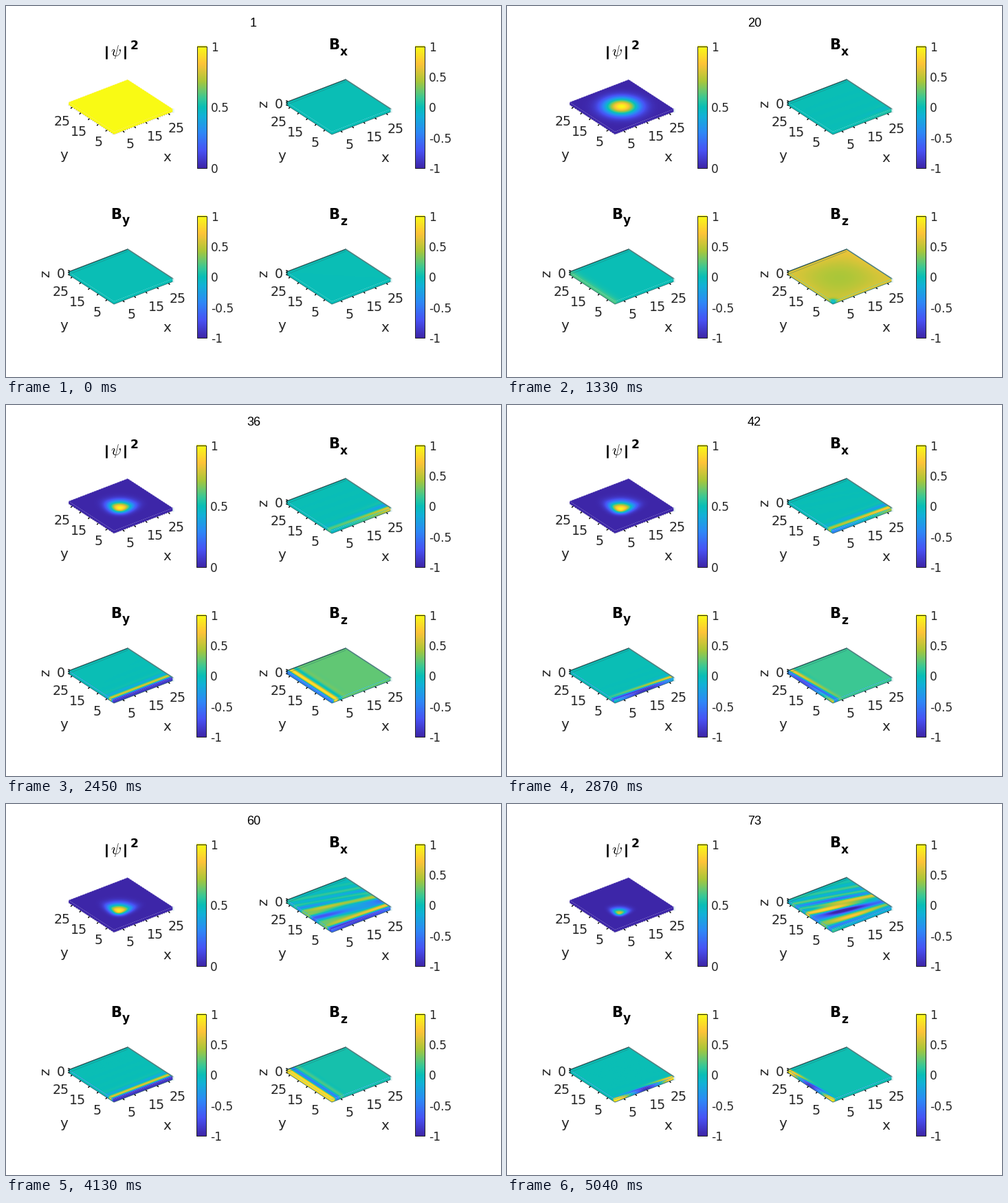
These frames come from a looping animation (720x540 px, 5110 ms). A matplotlib script:

```python
import numpy as np
import matplotlib.pyplot as plt
from matplotlib.animation import FuncAnimation
from matplotlib.colors import LinearSegmentedColormap
from matplotlib.patches import Rectangle
from matplotlib.transforms import Affine2D

W, H = 720, 540
FRAMES, STEP = 73, 70
GRAY = "#262626"

plt.rcParams["font.family"] = "DejaVu Sans"
plt.rcParams["mathtext.fontset"] = "cm"

PARULA = LinearSegmentedColormap.from_list("parula_like", [
    (0.0, (0.242, 0.150, 0.660)),
    (1 / 7, (0.281, 0.323, 0.958)),
    (2 / 7, (0.179, 0.529, 0.968)),
    (3 / 7, (0.069, 0.695, 0.839)),
    (0.5, (0.035, 0.745, 0.715)),
    (4 / 7, (0.216, 0.784, 0.592)),
    (5 / 7, (0.672, 0.779, 0.223)),
    (6 / 7, (0.997, 0.766, 0.220)),
    (1.0, (0.977, 0.984, 0.081)),
])

# Slab geometry in the first panel, pixels with y pointing down
FRONT = np.array([157, 183])
X_EDGE = np.array([86, -33])
Y_EDGE = np.array([-66, -43])
DEPTH = np.array([0, 4])

U, V = np.meshgrid(np.linspace(0, 1, 60), np.linspace(0, 1, 60))

fig = plt.figure(figsize=(W / 72, H / 72), dpi=72, facecolor="white")
ax = fig.add_axes([0, 0, 1, 1])
left_shift = Affine2D()


def write(x, y, text, size, rise=0.365, **style):
    """Place text so that its glyphs are centred on y."""
    style = {"color": GRAY, "ha": "center", **style}
    return ax.text(x, y + rise * size, text, fontsize=size, va="baseline", **style)


def sheet(origin, a, b, lo, z):
    """Image on the parallelogram spanned by a and b."""
    frame = Affine2D(np.array([[a[0], b[0], origin[0]],
                               [a[1], b[1], origin[1]],
                               [0, 0, 1]], float))
    return ax.imshow(np.zeros((2, 2)), cmap=PARULA, vmin=lo, vmax=1,
                     extent=(0, 1, 0, 1), origin="lower", aspect="auto",
                     interpolation="bilinear", zorder=z,
                     transform=frame + ax.transData)


def line(points, **style):
    xs, ys = zip(*points)
    return ax.plot(xs, ys, **{"solid_capstyle": "round", **style})[0]


class Slab:
    def __init__(self, shift, lo):
        front = FRONT + shift
        left, right = front + Y_EDGE, front + X_EDGE
        back = left + X_EDGE
        self.side_y = sheet(front, Y_EDGE, DEPTH, lo, 2)
        self.side_x = sheet(front, X_EDGE, DEPTH, lo, 2)
        self.top = sheet(front, X_EDGE, Y_EDGE, lo, 3)
        for t in (np.arange(5, 30, 5) - 1) / 26:
            for edge, out in ((X_EDGE, (1.6, 1.6)), (Y_EDGE, (-1.6, 1.6))):
                p = front + DEPTH + t * edge
                line([p, p + out], color="black", lw=1.5, zorder=1)
        rim = [left + DEPTH, front + DEPTH, right + DEPTH]
        if lo == 0:
            line(rim, color="black", lw=0.8, ls=(0, (1, 3)), alpha=0.7, zorder=4)
            line([*rim, right, back, left, rim[0]], color="white", lw=1.2,
                 ls=(0, (1.5, 1.5)), alpha=0.45, zorder=4)
        else:
            line(rim, color="#0f4f50", lw=0.9, alpha=0.7, zorder=4)
            line([left, back], color="#2b5657", lw=1.4, zorder=4)
            line([back, right], color="#4f8080", lw=1.6, zorder=4)
            line([left + (2, 3), back + (0, 3)], color="#2b6c6c", lw=0.7,
                 alpha=0.5, zorder=4)
            for dy in (-2, 1, 4):
                line([left + (-0.5, dy), left + (1.5, dy + 0.5)], color="black",
                     lw=1.3, zorder=5)
        line([right, right + DEPTH], color="#d8f0f0", lw=3, alpha=0.6, zorder=4)

    def show(self, z):
        self.top.set_data(z)
        self.side_x.set_data(np.vstack([z[0], z[0]]))
        self.side_y.set_data(np.vstack([z[:, 0], z[:, 0]]))


def axis_labels(dx, dy, flat):
    k = 2 if flat else 0
    for text, x, y in (("25", 80, 168), ("15", 104, 183), ("5", 133, 198)):
        write(x + dx + k, y + dy - k / 2, text, 19)
    for text, x, y in (("5", 183, 201), ("15", 219, 190), ("25", 250, 178)):
        write(x + dx - k, y + dy - k / 2, text, 19)
    write(234 + dx, 222 + dy - k / 2, "x", 20, rise=0.27)
    write(84 + dx, 221 + dy - k / 2, "y", 20, rise=0.17)
    if not flat:
        write(80 + dx, 142.5 + dy, "0", 19)
        ax.text(58 + dx, 142.5 + dy, "z", fontsize=20, color=GRAY, rotation=90,
                ha="center", va="center")


def color_bar(dx, dy, lo, moving):
    move = (left_shift if moving else Affine2D()) + ax.transData
    x, top, height = 277.5 + dx, 58.5 + dy, 177.5
    ax.imshow(np.linspace(1, 0, 256)[:, None], cmap=PARULA, aspect="auto",
              extent=(x, x + 14, top + height, top), transform=move)
    ax.add_patch(Rectangle((x, top), 14, height, fill=False, ec=GRAY, lw=1,
                           transform=move, zorder=5))
    count = 3 if lo == 0 else 5
    for i, value in enumerate(np.linspace(1, lo, count)):
        write(x + 20.5, top + 1 + height * i / (count - 1), f"{value:g}".replace("\u2212", "-"),
              17, ha="left", transform=move)


def title(dx, dy, sub):
    style = dict(color="black", weight="bold")
    write(160 + dx, 55 + dy, "B", 21, **style)
    write(174 + dx, 67 + dy, sub, 17, rise=0.17 if sub == "y" else 0.27, **style)


def psi_title():
    for x in (146, 173):
        line([(x, 57.5), (x, 76.5)], color="black", lw=2.6, solid_capstyle="butt")
    write(159.5, 68, r"$\psi$", 22, rise=0.23, color="black")
    write(186.5, 57, "2", 17, color="black", weight="bold")


def ease(n, start, end):
    s = np.clip((n - start) / (end - start), 0, 1)
    return s * s * (3 - 2 * s)


def bump(x, mid, width):
    return np.exp(-((x - mid) / width) ** 2)


def density(n):
    """A full slab that melts from the rim into a drifting spot."""
    if n == 1:
        return np.ones_like(U)
    width = 0.15 + 0.46 * np.exp(-(n / 14) ** 1.6) - 0.055 * ease(n, 55, 73)
    power = 6 - 4 * ease(n, 4, 20)
    centre = 0.5 - 0.0032 * max(n - 15, 0)
    skew = 0.34 * ease(n, 20, 48)
    peak = 1 - 0.2 * ease(n, 60, 73)
    base = 0.4 * (1 - ease(n, 0, 18))

    def profile(s):
        d = s - centre
        return np.exp(-np.abs(d / (width * (1 + skew * np.sign(d)))) ** power)

    return base + (peak - base) * profile(U) * profile(V)


def rim_wave(n, s, t, start, rate):
    """Breathing wave that hugs the edge s = 0 and twists along t as it narrows."""
    breath = 0.5 + 0.5 * np.cos(2 * np.pi * (n - 36) / 24.5)
    width = 0.04 + 0.085 * breath
    phase = np.pi * (start + rate * (n - 36))
    wave = np.cos(2 * np.pi * s / 0.16 - phase + 6.2 * (1 - breath) * t)
    return 0.9 * ease(n, 20, 38) * wave * np.exp(-(s / width) ** 2)


def field_x(n):
    q = V + 0.18 * U
    streaks = np.cos(2 * np.pi * (q - 0.57) / 0.37) * bump(q, 0.42, 0.27)
    streaks = streaks * (0.75 + 0.25 * np.cos(6 * U - 0.12 * n))
    ripples = 0.3 * np.cos(38 * q + 5 * U - 0.2 * n) * bump(q, 0.7, 0.3)
    lean = 1 - ease(n, 24, 52)
    edge = np.cos(2 * np.pi * (V + 0.04 * U) / 0.2 - 0.09 * (n - 16)) * bump(V, 0, 0.13)
    edge_gain = ease(n, 12, 50) * (1 - 0.5 * ease(n, 52, 70))
    return (1.1 * ease(n, 40, 75) * (streaks + ripples)
            + edge_gain * (1 - lean + lean * U ** 2) * edge)


def field_y(n):
    return (rim_wave(n, V, U, start=1, rate=0.082)
            + 0.2 * bump(n, 21, 5) * np.exp(-U / 0.05))


def field_z(n):
    rim = 0.7 * (1 - np.exp((1 - n) / 4)) / (1 + ((n - 1) / 30) ** 4)
    core = rim * (1 - np.exp(-(n / 18) ** 2.2))
    bowl = np.abs(np.sin(np.pi * U) * np.sin(np.pi * V)) ** 0.8
    slope = 0.08 * bump(n, 16, 8) * (U + V - 1)
    notch = 0.6 * bump(n, 20, 4) * np.exp(-(U ** 2 + V ** 2) / 0.004)
    return (rim + (core - rim) * bowl + slope - notch
            + rim_wave(n, U, V, start=0.8, rate=0.14))


panels = []
for dx, dy, lo, sub, field in (
    (0, 0, 0, None, density),
    (317, 0, -1, "x", field_x),
    (0, 247, -1, "y", field_y),
    (317, 247, -1, "z", field_z),
):
    panels.append((Slab(np.array([dx, dy]), lo), field))
    axis_labels(dx, dy, flat=lo == 0)
    color_bar(dx, dy, lo, moving=dx == 0)
    if sub:
        title(dx, dy, sub)
    else:
        psi_title()

counter = write(360, 24, "1", 18, rise=0.345, color="black", family="Liberation Sans")

ax.set_xlim(0, W)
ax.set_ylim(H, 0)
ax.axis("off")


def update(i):
    n = i + 1
    counter.set_text(str(n))
    left_shift.clear().translate(0 if n == 1 else -1, 0)
    for slab, field in panels:
        slab.show(field(n))
    return []


anim = FuncAnimation(fig, update, frames=FRAMES, interval=STEP, repeat=True,
                     repeat_delay=0, blit=False)
plt.show()
```
